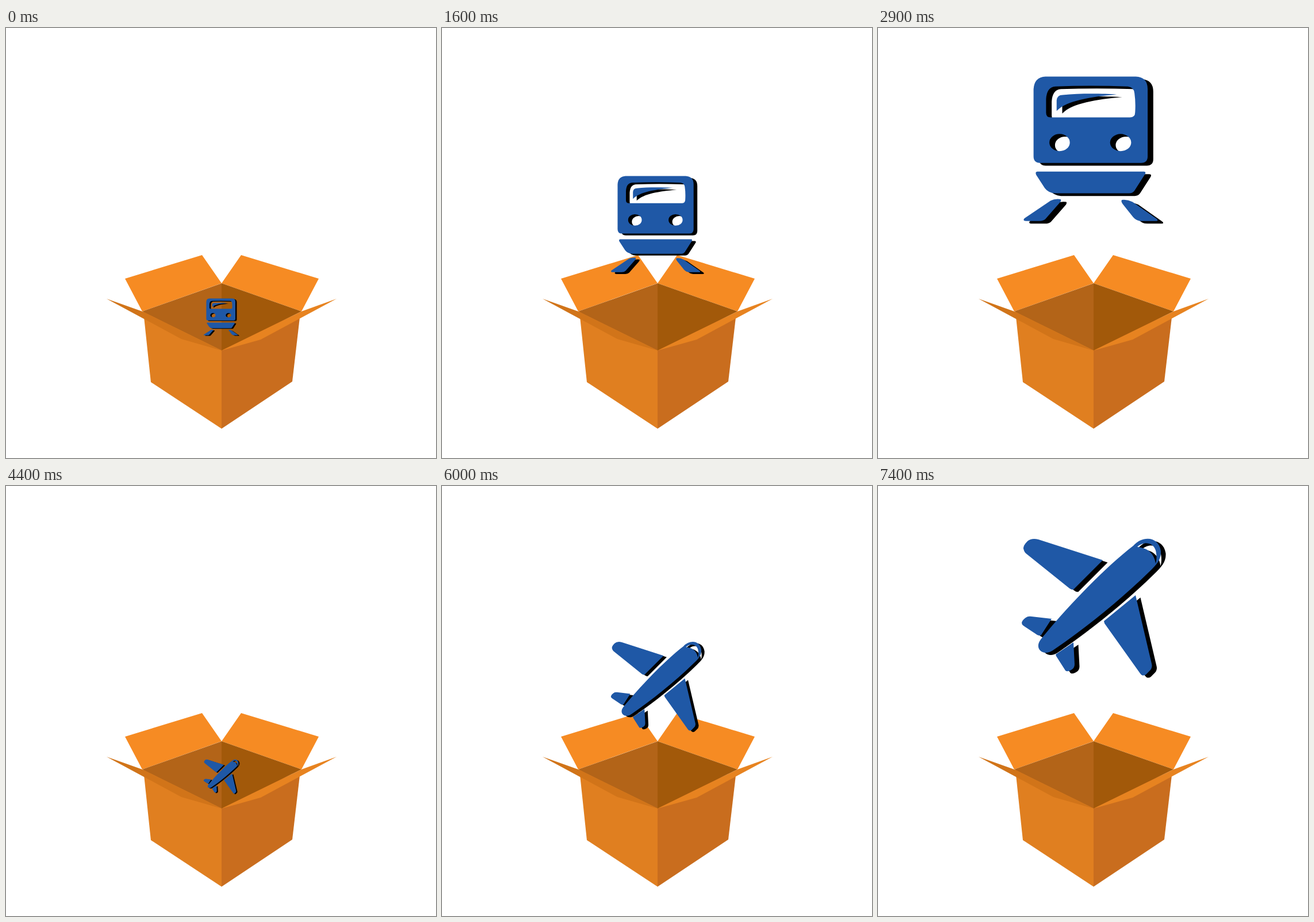
Write an HTML page that moves like this. It is 748 px wide and 748 px high and loops after 8.9 s.

```html
<!DOCTYPE html>
<html lang="en">
<head>
<meta charset="utf-8">
<title>Box with train and plane</title>
<style>
html, body { margin: 0; width: 100%; height: 100%; overflow: hidden; background: #fff; }
svg { display: block; width: 100%; height: 100%; }
.icon { fill-rule: evenodd; }
</style>
</head>
<body>
<svg viewBox="0 0 748 748">
  <defs>
    <path id="train" d="
      M302 151H439Q457 152 457 170V272Q457 282 447 282H294Q284 282 284 272V170Q285 152 302 151Z
      M317 166Q304 167 303 185V206Q303 213 310 213H430Q438 213 438 205Q439 190 437 176Q436 167 427 166Q370 164 317 166Z
      M319 203V187Q320 179 328 179C355 176 390 177 410 178C370 182 335 187 319 203Z
      M308 251a15.5 13 0 1 0 31 0a15.5 13 0 1 0 -31 0Z
      M400 251a16 13 0 1 0 32 0a16 13 0 1 0 -32 0Z
      M290 295H451Q455 295 453 299L437 324Q434 328 429 328H317Q306 327 301 320L288 300Q286 295 290 295Z
      M310 339Q316 336 325 337Q327 339 323 343L302 367Q299 370 293 370H273Q267 370 270 366Z
      M418 338Q426 337 434 341L471 367Q474 370 469 370H448Q440 370 435 364L419 344Q416 340 418 338Z"/>
    <path id="plane" d="
      M253 109Q252 104 260 96Q267 90 279 93L391 129L340 180Q337 181 333 178L257 117Q254 114 253 109Z
      M393 235L448 190L476 309Q478 317 472 322L466 328Q460 332 456 326L394 239Z
      M250 238Q251 233 257 229Q261 226 267 227L302 231L284 259Q281 261 277 259L253 243Q250 241 250 238Z
      M309 293L340 272L342 310Q342 317 336 320Q329 324 326 321L310 296Z
      M283 267C326 214 392 144 444 104C460 86 488 87 492 113C493 127 486 136 471 150C420 200 357 250 304 286C287 297 271 283 283 267Z
      M451 106C460 97 478 96 483 112C485 120 485 128 483 135C481 120 472 108 451 106Z"/>
  </defs>
  <path fill="#f68b23" d="M207 436L341 395L375 444L237 493ZM409 395L544 436L514 493L375 444Z"/>
  <path fill="#e07f20" d="M239 493L375 555V697L252 616Z"/>
  <path fill="#c96d1e" d="M375 555L512 495L498 615L375 697Z"/>
  <path fill="#b36418" d="M237 493L375.5 444V561Z"/>
  <path fill="#a2590a" d="M375 444L514 493L375 561Z"/>
  <path fill="#d17419" d="M175 471L237 493L375 561L305 541Z"/>
  <path fill="#e78320" d="M575 471L514 493L375 561L443 542Z"/>
  <g id="cargo" class="icon">
    <use id="shadow" x="8.5" y="4" fill="#000"/>
    <use id="front" fill="#1f58a6"/>
  </g>
</svg>
<script>
const LOOP = 8900, PLANE_START = 4400, STEP = 100;
const byId = id => document.getElementById(id);
const cargo = byId('cargo'), layers = [byId('shadow'), byId('front')];

// Each icon rises and grows linearly in discrete steps, then holds.
const icons = {
  train: { steps: 29, x: 375, y: 262.5, from: 503, rise: 10.02, size: .2925, grow: .02948 },
  plane: { steps: 30, x: 375, y: 211, from: 505.5, rise: 9.817, size: .25, grow: .025 }
};

function draw(now) {
  const t = now % LOOP;
  const name = t < PLANE_START ? 'train' : 'plane';
  const icon = icons[name];
  const elapsed = name === 'train' ? t : t - PLANE_START;
  const k = Math.min(icon.steps, Math.floor(elapsed / STEP));
  for (const layer of layers) layer.setAttribute('href', '#' + name);
  cargo.setAttribute('transform',
    `translate(${icon.x} ${icon.from - icon.rise * k}) scale(${icon.size + icon.grow * k}) translate(${-icon.x} ${-icon.y})`);
}

function tick() {
  draw(performance.now());
  requestAnimationFrame(tick);
}
tick();
</script>
</body>
</html>
```
